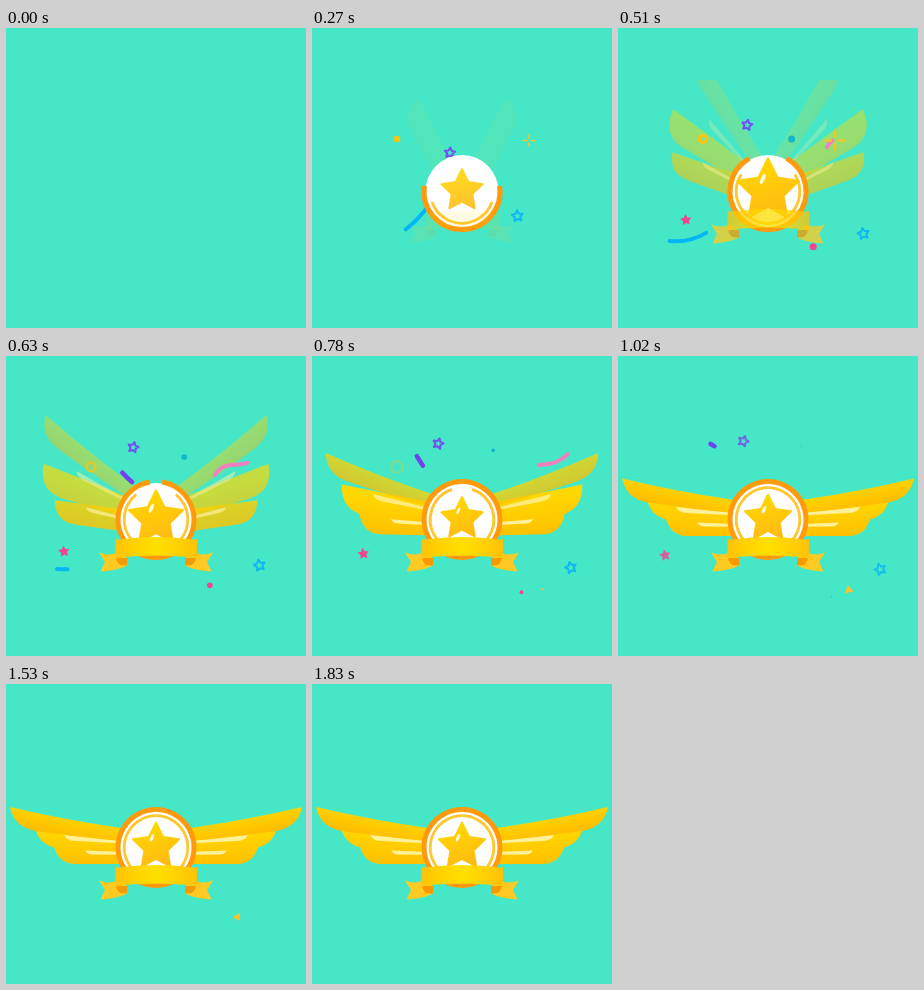
Write an HTML page that moves like this. It is 300 by 300 pixels and loops after 1.86 s.

```html
<!DOCTYPE html>
<html lang="en">
<head>
<meta charset="utf-8">
<title>Winged star badge</title>
<style>
html, body { margin: 0; width: 100%; height: 100%; overflow: hidden; background: #46e7c7; }
svg { display: block; width: 100vw; height: 100vh; }
</style>
</head>
<body>
<svg viewBox="0 0 300 300">
  <defs>
    <linearGradient id="topFill" gradientUnits="userSpaceOnUse" x1="70" y1="132" x2="65" y2="156">
      <stop stop-color="#ffd600"/><stop offset="1" stop-color="#ffba00"/>
    </linearGradient>
    <linearGradient id="lowFill" gradientUnits="userSpaceOnUse" x1="70" y1="146" x2="68" y2="182">
      <stop stop-color="#ffd800"/><stop offset="1" stop-color="#ffbe00"/>
    </linearGradient>
    <linearGradient id="bandFill">
      <stop stop-color="#ffc20a"/><stop offset=".2" stop-color="#ffd000"/>
      <stop offset=".5" stop-color="#ffe000"/><stop offset="1" stop-color="#ffc208"/>
    </linearGradient>
    <linearGradient id="starFill" x1=".35" y1="0" x2=".65" y2="1">
      <stop stop-color="#ffd800"/><stop offset="1" stop-color="#ffba14"/>
    </linearGradient>
    <clipPath id="wingClip"><path d="M0 52H300V300H0Z"/></clipPath>
    <g id="wing">
      <path id="feather3" fill="url(#lowFill)" d="M47 159 Q51 180 70 180 H145 V158Z"/>
      <path id="shine2" fill="#fff09a" d="M79 166.500 L145 169 V171 L86 170.500 Q81 170 79 166.500Z"/>
      <path id="feather2" fill="url(#lowFill)" d="M28 135 Q29 162 54 164.500 L145 169 V152Z"/>
      <path id="shine1" fill="#fff09a" d="M58 151 L145 160 V161 L70 157 Q61 157 58 151Z"/>
      <path id="feather1" fill="url(#topFill)" d="M4 123 Q8 143 30 147 Q72 153 145 160 V148 L112 143.500 Q57 135.500 4 123Z"/>
    </g>
    <g id="tail">
      <path fill="#ffcb22" d="M93 196.500 Q102 200 111 197 L121 202 V209.500 Q112 214.500 94.500 215.500 L99 206Z"/>
      <path fill="#f79a00" d="M110 202 H121 V209.500 Q111 210.500 110 202Z"/>
    </g>
  </defs>
  <rect width="300" height="300" fill="#46e7c7"/>
  <g clip-path="url(#wingClip)">
    <use href="#wing"/>
    <use href="#wing" transform="translate(300) scale(-1 1)"/>
  </g>
  <g id="confetti"></g>
  <g id="tails">
    <use href="#tail"/>
    <use href="#tail" transform="translate(300) scale(-1 1)"/>
  </g>
  <circle id="disc" r="36.500" fill="#fff"/>
  <path id="ring" fill="none" stroke="#ff9a0c" stroke-width="5"/>
  <path id="innerRing" fill="none" stroke="#ffc630" stroke-width="2.800"/>
  <g id="star">
    <path id="starShape" fill="url(#starFill)" stroke="url(#starFill)" stroke-width="2" stroke-linejoin="round"/>
    <ellipse id="glint" cx="-4" cy="-9" rx="1.500" ry="4" fill="#fffbe0" transform="rotate(24 -4 -9)"/>
  </g>
  <path id="band" fill="url(#bandFill)" d="M109.500 183 Q112 184 118 183 Q150 179 182 183 Q188 184 191 183 V203 Q188 201.500 183 201 Q150 198 117 201 Q112 201.500 109.500 203Z"/>
</svg>
<script>
const LOOP = 1860, STEP = 30, CX = 150, CY = 163.5;
const $ = id => document.getElementById(id);
const set = (el, attrs) => { for (const k in attrs) el.setAttribute(k, attrs[k]); };
const ramp = (t, from, to) => Math.min(1, Math.max(0, (t - from) / (to - from)));
const easeOut = (u, power = 2) => 1 - (1 - u) ** power;
const mix = (a, b, u) => a + (b - a) * u;

function starPath(radius) {
  const points = Array.from({ length: 10 }, (_, i) => {
    const r = i % 2 ? radius / 2 : radius, a = (i * 36 - 90) * Math.PI / 180;
    return `${r * Math.cos(a)} ${r * Math.sin(a)}`;
  });
  return `M${points.join('L')}Z`;
}

// Arc centred on the bottom, open at the top; `part` runs from 0 to a full ring.
function bottomArc(r, part) {
  const a = Math.min(part, .999) * Math.PI;
  const dx = r * Math.sin(a), y = CY + r * Math.cos(a);
  return `M${CX - dx} ${y}A${r} ${r} 0 ${part > .5 ? 1 : 0} 0 ${CX + dx} ${y}`;
}

function add(tag, attrs) {
  const el = document.createElementNS('http://www.w3.org/2000/svg', tag);
  set(el, attrs);
  return $('confetti').appendChild(el);
}
const line = (d, stroke, width) =>
  add('path', { d, fill: 'none', stroke, 'stroke-width': width, 'stroke-linecap': 'round', 'stroke-linejoin': 'round' });
const solid = (d, fill) => add('path', { d, fill });

// Every feather swings down the same way, one after the other.
const featherDelay = { feather3: 0, shine2: 50, feather2: 60, shine1: 150, feather1: 180 };

const stars = [
  { el: line(starPath(5.4), '#7450ee', 2), x: 125, y: 84, start: 130, spin: 20 },
  { el: line(starPath(5.8), '#10b8f2', 2), x: 264, y: 214, start: 130, spin: -20 },
  { el: solid(starPath(6), '#f0468e'), x: 45, y: 200, start: 190, spin: -10 },
];
const dots = [
  { el: add('circle', { r: 3.6, fill: '#12b6cc' }), x: 184, y: 88, start: 260 },
  { el: add('circle', { r: 3.6, fill: '#f0468e' }), x: 215, y: 243, start: 260 },
];
const streaks = [
  { el: line('M209 119C220 100 236 118 257 97', '#f280be', 4), start: 480, time: 360, lag: 220 },
  { el: line('M118 176C100 200 80 216 51 213', '#04b6f6', 4), start: 180, time: 360, lag: 220 },
  { el: line('M126 126C104 108 106 92 90 87', '#7340ee', 4.5), start: 550, time: 600, lag: 90 },
];
for (const s of streaks) s.el.setAttribute('pathLength', 1);

const CROSS = 'M3 0H7M-3 0H-7M0 3V7M0 -3V-7';
const sparkles = [
  { el: line(CROSS, '#ffc21c', 2), x: 217, y: 112.5, start: 180 },
  { el: line(CROSS, '#ffc21c', 2), x: 83, y: 219, start: 1110 },
];
const halo = add('circle', { cx: 85, cy: 111, fill: 'none', stroke: '#ffc40c' });
const triangle = solid('M-4.8 0L4 -4.8V4.8Z', '#ffc02c');
set($('starShape'), { d: starPath(24.2) });

// Position of a piece thrown out of the badge, slowing down towards its resting place.
function thrown(p, t) {
  const u = 1 - Math.exp(-Math.max(0, t - p.start) / 210);
  return `translate(${mix(CX, p.x, u)} ${mix(CY, p.y, u)})`;
}

function drawWings(t) {
  for (const id in featherDelay) {
    const local = t - featherDelay[id];
    const angle = 70 * (1 - easeOut(ramp(local, 240, 900), 2.4));
    set($(id), { transform: `rotate(${angle} ${CX} 163)`, opacity: ramp(local, 240, 720) });
  }
}

function drawConfetti(t) {
  for (const p of stars)
    set(p.el, {
      transform: `${thrown(p, t)} rotate(${p.spin * t / 1000})`,
      opacity: t > p.start ? 1 - ramp(t, 930, 1530) : 0,
    });
  for (const p of dots)
    set(p.el, { transform: `${thrown(p, t)} scale(${t > p.start ? 1 - ramp(t, 500, 1110) : 0})` });
  for (const s of streaks) {
    const head = easeOut(ramp(t, s.start, s.start + s.time));
    const tail = easeOut(ramp(t, s.start + s.lag, s.start + s.lag + s.time));
    set(s.el, {
      'stroke-dasharray': `${Math.max(head - tail, .001)} 9`,
      'stroke-dashoffset': -tail,
      opacity: head - tail > .02 ? 1 : 0,
    });
  }
  for (const s of sparkles) {
    const u = ramp(t, s.start, s.start + 420);
    set(s.el, {
      transform: `translate(${s.x} ${s.y}) scale(${mix(.6, 1.5, u)})`,
      opacity: Math.min(1, 8 * u, 4 * (1 - u)),
    });
  }
  const grow = ramp(t, 180, 930);
  set(halo, { r: mix(1, 7, grow), 'stroke-width': mix(3.4, 1.6, grow), opacity: t > 180 ? 1 - ramp(t, 510, 930) : 0 });
  const turn = 150 * (1 - ramp(t, 780, 1260));
  const size = ramp(t, 660, 1080) - ramp(t, 1500, 1680);
  set(triangle, { transform: `translate(230.5 233) rotate(${turn}) scale(${size})` });
}

function drawBadge(t) {
  set($('disc'), { transform: `translate(${CX} ${CY}) scale(${easeOut(ramp(t, 0, 210))})` });
  const outer = Math.sqrt(ramp(t, 90, 690)), inner = Math.sqrt(ramp(t, 150, 930));
  set($('ring'), { d: bottomArc(38, outer), opacity: outer > 0 ? 1 : 0 });
  set($('innerRing'), { d: bottomArc(31.8, inner), opacity: inner > 0 ? 1 : 0 });

  const bounce = Math.sin(Math.PI * ramp(t, 270, 780)) ** 2;
  const size = .9 * easeOut(ramp(t, 30, 270)) + .42 * bounce + .1 * ramp(t, 780, 990);
  set($('star'), { transform: `translate(${CX} 162.8) scale(${size})`, opacity: mix(.7, 1, ramp(t, 30, 420)) });
  set($('glint'), { opacity: ramp(t, 330, 480) });

  const ribbon = ramp(t, 230, 600), spread = mix(.9, 1, ramp(t, 240, 480));
  for (const id of ['tails', 'band'])
    set($(id), { opacity: ribbon, transform: `translate(${CX} 200) scale(${spread}) translate(${-CX} -200)` });
}

function draw(t) {
  drawWings(t);
  drawConfetti(t);
  drawBadge(t);
}

const start = performance.now();
function tick() {
  const t = (performance.now() - start) % LOOP;
  draw(Math.floor(t / STEP) * STEP);
  requestAnimationFrame(tick);
}
draw(0);
requestAnimationFrame(tick);
</script>
</body>
</html>
```
